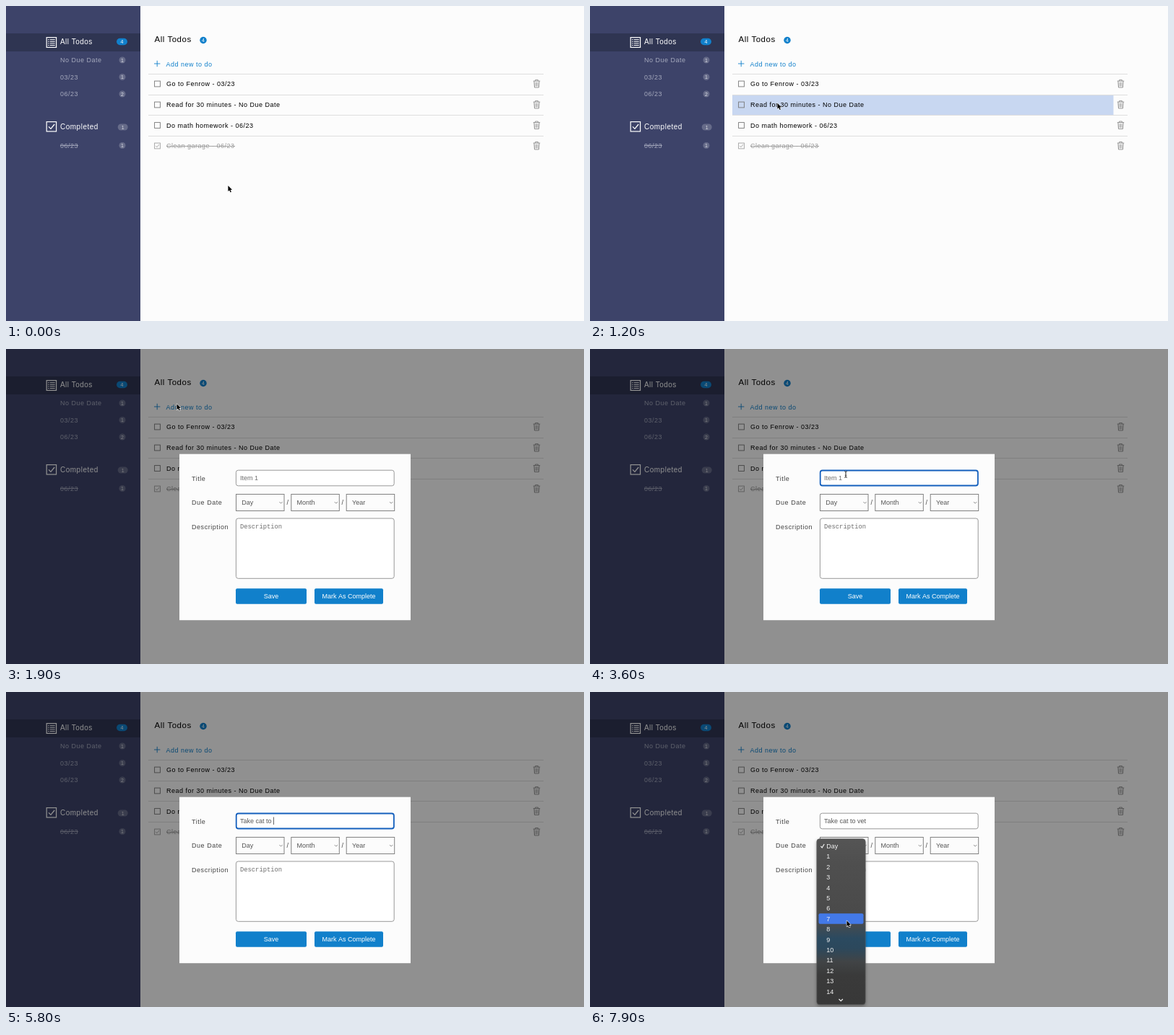
These frames come from a looping animation (800x437 px, 8 s). An HTML page with a canvas:

```html
<!DOCTYPE html>
<html lang="en">
<head>
<meta charset="utf-8">
<title>Todos</title>
<style>
html, body { margin: 0; width: 100%; height: 100%; overflow: hidden; background: #fcfcfc; }
canvas { display: block; }
</style>
</head>
<body>
<canvas id="stage" width="800" height="437"></canvas>
<script>
const c = document.getElementById('stage').getContext('2d');
const SANS = '"Liberation Sans", Arial, sans-serif';
const MONO = '"Liberation Mono", "Courier New", monospace';
const BLUE = '#1180cb';
const LOOP = 8000, STEP = 100;
const OPEN = 1900, FOCUS = 3100, TYPE = 4000, SHOW = 6700, MENU = 7100;

// time, x, y of the pointer tip
const path = [
  [0, 307, 249], [100, 306, 248], [200, 303, 247], [500, 303, 247],
  [700, 294, 226], [1000, 272, 171], [1400, 246, 98], [1500, 240, 83],
  [1800, 237, 76], [1900, 236, 76], [2300, 248, 100], [2700, 312, 150],
  [3000, 354, 174], [6700, 354, 174], [7000, 352, 212], [7200, 352, 214],
  [7500, 354, 300], [7700, 356, 358], [7900, 355, 317]
];

const phrase = 'Take cat to vet';
const keys = [4000, 4200, 4400, 4600, 4800, 5000, 5100, 5300, 5400, 5600, 5700, 5800, 6000, 6200, 6400];

const rows = [
  ['Go to Fenrow - 03/23', 108, 94, 123],
  ['Read for 30 minutes - No Due Date', 137, 123, 151.5],
  ['Do math homework - 06/23', 165.5, 151.5, 180],
  ['Clean garage - 06/23', 194, 180, 209]
];

function text(s, x, y, size, color, gap = 0, align = 'left', face = SANS) {
  c.font = size + 'px ' + face;
  c.letterSpacing = gap + 'px';
  c.textAlign = align;
  c.fillStyle = color;
  c.fillText(s, x, y + size * 0.36);
}

function rect(x, y, w, h, color) {
  c.fillStyle = color;
  c.fillRect(x, y, w, h);
}

function round(x, y, w, h, r, fill, stroke, width = 1) {
  c.beginPath();
  c.roundRect(x, y, w, h, r);
  if (fill) { c.fillStyle = fill; c.fill(); }
  if (stroke) { c.strokeStyle = stroke; c.lineWidth = width; c.stroke(); }
}

function line(points, color, width = 1) {
  c.beginPath();
  for (let i = 0; i < points.length; i += 2) c.lineTo(points[i], points[i + 1]);
  c.strokeStyle = color;
  c.lineWidth = width;
  c.stroke();
}

function badge(s, x, y, w, h, fill, color) {
  round(x - w / 2, y - h / 2, w, h, h / 2, fill);
  text(s, x, y, 7, color, 0, 'center');
}

function pointAt(t) {
  let i = 1;
  while (i < path.length - 1 && path[i][0] < t) i++;
  const [t0, x0, y0] = path[i - 1], [t1, x1, y1] = path[i];
  const k = Math.min(1, (t - t0) / (t1 - t0));
  return [x0 + (x1 - x0) * k, y0 + (y1 - y0) * k];
}

function sidebar() {
  rect(0, 0, 186, 437, '#3d4369');
  rect(0, 38, 186, 25, '#2f3552');
  c.lineJoin = 'miter';
  c.strokeStyle = '#fff';
  c.lineWidth = 1.2;
  c.strokeRect(56.2, 43.6, 13.4, 13.8);
  for (let y = 46.7; y < 56; y += 2.6) {
    line([58, y, 59.5, y], '#fff');
    line([60.7, y, 67.8, y], '#fff');
  }
  text('All Todos', 75, 49, 10, '#fff', 0.45);
  badge('4', 160.5, 49.5, 15, 9.5, BLUE, '#fff');

  const dim = '#a5a9bd', pill = '#666b89';
  [['No Due Date', 75, '1'], ['03/23', 98.5, '1'], ['06/23', 122, '2']].forEach(([s, y, n]) => {
    text(s, 75, y, 9, dim, 0.5);
    badge(n, 161, y, 9, 9, pill, '#dcdee6');
  });

  c.strokeStyle = '#fff';
  c.lineWidth = 1.2;
  c.strokeRect(56.2, 160.6, 13.4, 13.4);
  line([59, 167.4, 62, 170.4, 67.2, 164], '#fff', 1.3);
  text('Completed', 75, 167.5, 10, '#fff', 0.5);
  badge('1', 161.7, 168, 14, 9, pill, '#dcdee6');
  text('06/23', 75, 193.5, 9, dim, 0.5);
  line([75, 193.5, 100, 193.5], dim, 0.9);
  badge('1', 161, 193.5, 9, 9, pill, '#dcdee6');
}

function trash(y) {
  const g = '#8a8a8a';
  line([729.8, y - 3.7, 739.2, y - 3.7], g, 0.9);
  line([732.6, y - 3.7, 732.6, y - 5.3, 736.4, y - 5.3, 736.4, y - 3.7], g, 0.8);
  line([730.9, y - 3.5, 731.5, y + 5.2, 737.5, y + 5.2, 738.1, y - 3.5], g, 0.9);
  for (const x of [732.9, 734.5, 736.1]) line([x, y - 2, x, y + 3.7], g, 0.7);
}

function list(x, y, modal) {
  text('All Todos', 205.5, 46.3, 11.5, '#000', 0.5);
  badge('4', 273, 47.5, 9.5, 9.5, BLUE, '#fff');
  line([205, 80, 213.4, 80], BLUE, 0.9);
  line([209.2, 75.8, 209.2, 84.2], BLUE, 0.9);
  text('Add new to do', 221.5, 80.3, 9, BLUE, 0.5);

  rows.forEach(([s, mid, top, end], i) => {
    if (!modal && x > 197 && x < 724 && y >= top && y < end) rect(197, top, 527.5, end - top, '#c8d7f1');
    rect(197, Math.floor(top), 547, 1, '#dedede');
    const done = i === 3;
    const gray = done ? '#a0a0a0' : '#777';
    c.strokeStyle = gray;
    c.lineWidth = 0.9;
    c.strokeRect(205.6, mid - 3.9, 7.8, 7.8);
    text(s, 222, mid + 0.2, 9, done ? '#999' : '#000', 0.5);
    if (done) {
      line([207.2, mid, 208.9, mid + 1.8, 212, mid - 1.9], gray, 0.9);
      line([222, mid + 0.5, 317, mid + 0.5], '#999', 0.9);
    }
    trash(mid - 0.2);
  });
}

function select(s, x) {
  c.strokeStyle = '#808080';
  c.lineWidth = 1;
  c.strokeRect(x + 0.5, 201.5, 66.5, 23);
  text(s, x + 8.3, 213, 9, '#555');
  line([x + 60.4, 212, x + 62.5, 214.2, x + 64.6, 212], '#777', 0.8);
}

function button(s, x, w) {
  round(x, 332.3, w, 21.4, 2, BLUE);
  text(s, x + w / 2, 343, 9, '#fff', 0, 'center');
}

function dialog(t) {
  rect(0, 0, 800, 437, 'rgba(0,0,0,.43)');
  rect(240, 145.7, 320, 230.5, '#fcfcfc');
  text('Title', 257, 179.8, 9, '#444', 0.55);
  text('Due Date', 257, 213, 9, '#444', 0.55);
  text('Description', 257, 246.3, 9, '#444', 0.55);

  const focus = t >= FOCUS && t < MENU;
  if (focus) round(318.7, 168.5, 218.2, 21, 3, '#fff', '#1560bd', 1.8);
  else round(318.4, 168.2, 218.8, 21.6, 3, '#fff', '#999');

  const count = keys.filter(k => k <= t).length;
  const typed = phrase.slice(0, count);
  text(typed || 'Item 1', 324, 179, 9, typed ? '#555' : '#6c6c6c');
  const last = count ? keys[count - 1] : FOCUS;
  if (focus && Math.floor((t - last) / 500) % 2 === 0) {
    rect(Math.floor(324 + (typed ? c.measureText(typed).width : 0)), 173.5, 1, 10.5, '#666');
  }

  select('Day', 318);
  text('/', 388.4, 213, 9, '#444');
  select('Month', 394.3);
  text('/', 464.6, 213, 9, '#444');
  select('Year', 470.7);
  round(318.4, 235, 218.8, 83.3, 3, '#fff', '#999');
  text('Description', 324, 246.2, 8.8, '#6c6c6c', 0, 'left', MONO);
  button('Save', 318, 98);
  button('Mark As Complete', 427, 95);
}

function menu(y) {
  const g = c.createLinearGradient(0, 203, 0, 434);
  [[0, '#555'], [0.15, '#4f4f4f'], [0.45, '#4a4a4a'], [0.52, '#454b50'], [0.6, '#2b4a60'],
   [0.66, '#2c485c'], [0.74, '#414446'], [0.82, '#3a3a3a'], [1, '#383838']]
    .forEach(([k, color]) => g.addColorStop(k, color));
  c.save();
  c.shadowColor = 'rgba(0,0,0,.35)';
  c.shadowBlur = 5;
  c.shadowOffsetY = 2;
  round(313.8, 203.7, 67.4, 230, 4, g);
  c.restore();
  round(313.8, 203.7, 67.4, 230, 4, null, '#606060', 0.6);

  const pitch = 14.42;
  const pick = Math.max(0, Math.min(14, Math.round((y - 213.5) / pitch)));
  round(316.5, 206.4 + pick * pitch, 62, 14.4, 2, '#4379e8');
  for (let i = 0; i < 15; i++) text(i ? '' + i : 'Day', 327.2, 213.6 + i * pitch, 9, '#f2f2f2');
  line([319.4, 213.9, 321.2, 216, 324.2, 211], '#f2f2f2', 1.2);
  line([344.5, 426, 347.2, 428.6, 349.9, 426], '#f2f2f2', 1.2);
}

function shape(x, y, points, fill, edge, width) {
  c.beginPath();
  for (let i = 0; i < points.length; i += 2) c.lineTo(x + points[i], y + points[i + 1]);
  c.closePath();
  c.lineJoin = 'round';
  c.lineWidth = width;
  c.strokeStyle = edge;
  c.stroke();
  c.fillStyle = fill;
  c.fill();
}

function arrow(x, y) {
  shape(x, y, [0.4, 0.3, 0.4, 8.2, 2.2, 6.6, 3.5, 9.5, 4.9, 8.9, 3.6, 6.1, 6, 6.1], '#000', '#fff', 1.2);
}

function hand(x, y) {
  shape(x, y, [-0.8, 0.8, 0, 0.2, 0.9, 0.8, 1.3, 3.6, 3, 3.4, 4.5, 4, 5.6, 4.5, 5.8, 7,
    4.8, 10, 0.2, 10, -1.4, 7.8, -3.2, 5.4, -2.5, 4.6, -0.4, 6], '#fff', '#222', 1.5);
}

function beam(x, y) {
  line([x - 1.8, y - 4.4, x, y - 3.6, x + 1.8, y - 4.4], '#222', 0.9);
  line([x, y - 3.8, x, y + 3.8], '#222', 1);
  line([x - 1.8, y + 4.4, x, y + 3.6, x + 1.8, y + 4.4], '#222', 0.9);
  line([x - 1.2, y + 1.3, x + 1.2, y + 1.3], '#222', 0.7);
}

function pointer(t, x, y) {
  if (t >= TYPE && t < SHOW) return;
  const modal = t >= OPEN;
  if (modal && x > 318 && x < 538 && y > 168 && y < 190) beam(x, y);
  else if (!modal && x > 204 && x < 290 && y > 73 && y < 88) hand(x, y);
  else arrow(x, y);
}

function draw(now) {
  const t = Math.floor(now % LOOP / STEP) * STEP;
  const [x, y] = pointAt(t);
  rect(0, 0, 800, 437, '#fcfcfc');
  sidebar();
  list(x, y, t >= OPEN);
  if (t >= OPEN) dialog(t);
  if (t >= MENU) menu(y);
  pointer(t, x, y);
}

let start;
function tick(now) {
  if (start === undefined) start = now;
  draw(now - start);
  requestAnimationFrame(tick);
}
requestAnimationFrame(tick);
</script>
</body>
</html>
```
